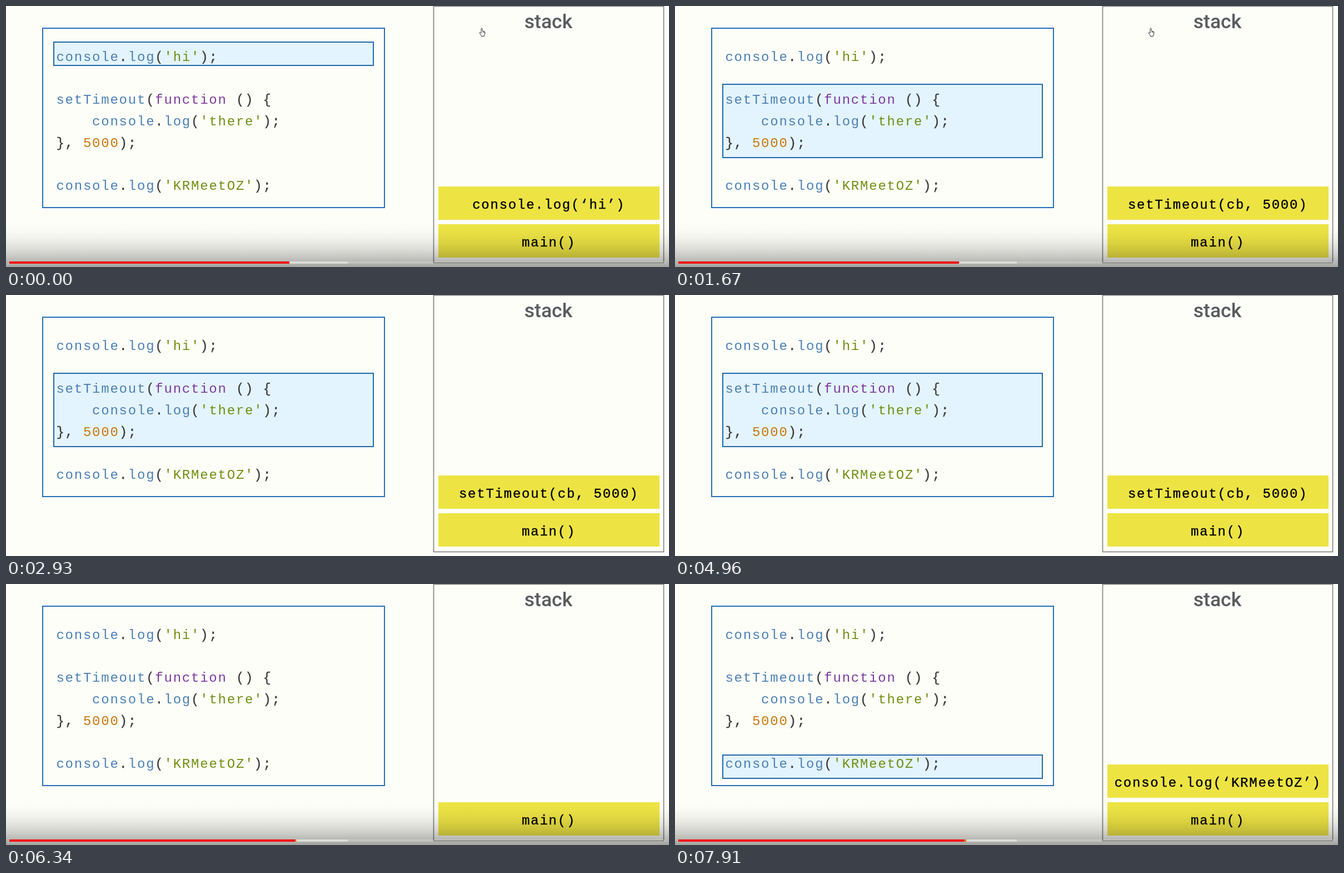
Write an HTML page that moves like this. It is 1193 by 470 pixels and loops after 7.99 s.

```html
<!DOCTYPE html>
<html lang="en">
<head>
<meta charset="utf-8">
<title>Call stack</title>
<style>
  html, body { margin: 0; width: 100%; height: 100%; overflow: hidden; background: #fefef9; }
  svg { display: block; width: 1193px; height: 470px; }
  .mono {
    font: 24px "Liberation Mono", "Courier New", monospace;
    letter-spacing: 1.77px;
    white-space: pre;
  }
  .title { font: 500 35.5px Roboto, sans-serif; fill: #595c5f; }
  .id { fill: #4a7fb3; }
  .kw { fill: #7b3a9d; }
  .str { fill: #6f8e10; }
  .num { fill: #c87608; }
  .op { fill: #3a3a3a; stroke: #3a3a3a; stroke-width: .3; }
  .frame { fill: none; stroke: #2470b8; stroke-width: 2; }
  .mark { fill: #e4f4fe; stroke: #1f68aa; stroke-width: 2; }
  .call { fill: #ede444; }
  .label { stroke: #000; stroke-width: .35; }
</style>
</head>
<body>
<svg viewBox="0 0 1193 470" xmlns="http://www.w3.org/2000/svg">
  <defs><linearGradient id="shade" x1="0" y1="0" x2="0" y2="1"></linearGradient></defs>
  <rect width="1193" height="470" fill="#fefef9"/>
  <rect class="frame" x="66" y="40" width="615" height="323"/>
  <g id="marks"></g>
  <g id="code"></g>
  <rect x="769.5" y="0.5" width="414" height="462" fill="none" stroke="#858585" stroke-width="1.7"/>
  <text class="title" x="976" y="40" text-anchor="middle">stack</text>
  <g id="calls"></g>
  <g id="controls">
    <rect y="388" width="1193" height="82" fill="url(#shade)"/>
    <rect x="6" y="460" width="1181" height="4" fill="#fff" fill-opacity=".2"/>
    <rect x="6" y="460" width="609" height="4" fill="#dcdcd8"/>
    <rect id="tail" x="520" y="460" height="4" fill="#d07a18"/>
    <rect id="played" x="6" y="460" height="4" fill="#f40808"/>
  </g>
  <path id="hand" d="M855 49V41.3q0-1.3 1.1-1.3t1.1 1.3V45l3.4.7q1.4.3 1.3 1.8l-.4 3.5-1 2v1.5h-5.2v-1.4l-2.9-3.9q-.8-1.3.3-1.7.9-.2 2.3 1.5z M858.7 46v2 M860.4 46.4v1.8"
    fill="#fff" stroke="#333" stroke-linejoin="round"/>
</svg>
<script>
const NS = 'http://www.w3.org/2000/svg';
const LOOP = 7990;
const FADE = 150;
const MARK_DELAY = 220;
const JUMP = 2060;
const CELL = 16.17;
const $ = id => document.getElementById(id);

function add(parent, tag, attrs, text) {
  const el = document.createElementNS(NS, tag);
  for (const k in attrs) el.setAttribute(k, attrs[k]);
  if (text) el.textContent = text;
  parent.append(el);
  return el;
}

const code = `console.log('hi');

setTimeout(function () {
    console.log('there');
}, 5000);

console.log('KRMeetOZ');`;

function kind(token) {
  if (token === 'function') return 'kw';
  if (token[0] === "'") return 'str';
  if (/\d/.test(token)) return 'num';
  return /[a-z]/i.test(token) ? 'id' : 'op';
}

code.split('\n').forEach((line, i) => {
  const row = add($('code'), 'text', { class: 'mono', x: 90.4, y: 98.8 + i * 38.75 });
  for (const token of line.match(/'\w+'|\w+|[^\w']+/g) || []) {
    add(row, 'tspan', { class: kind(token) }, token);
  }
});

// Shade deepens with the square of the height.
for (let u = 0; u <= 1; u += 0.125) {
  add($('shade'), 'stop', { offset: u, 'stop-color': '#000', 'stop-opacity': 0.36 * u * u });
}

function addCall(y, label) {
  const g = add($('calls'), 'g', {});
  add(g, 'rect', { class: 'call', x: 778, y, width: 398, height: 60 });
  add(g, 'text', {
    class: 'mono label', x: 976.6 - label.length * CELL / 2, y: y + 39.5
  }, label);
  return g;
}

addCall(393, 'main()');

// The calls share the slot above main(); each marks its lines of code.
const calls = [
  { label: 'console.log(‘hi’)', top: 65, height: 42, push: -1000, pop: 500 },
  { label: 'setTimeout(cb, 5000)', top: 141, height: 132, push: 870, pop: 5970 },
  { label: 'console.log(‘KRMeetOZ’)', top: 308, height: 42, push: 6490, pop: LOOP }
];
for (const c of calls) {
  c.block = addCall(325, c.label);
  c.mark = add($('marks'), 'rect', { class: 'mark', x: 86, y: c.top, width: 575, height: c.height });
}

const ramp = (t, start, span = FADE) => Math.min(1, Math.max(0, (t - start) / span));
const shown = (t, from, to, span) => ramp(t, from, span) - ramp(t, to, span);
const fade = (el, v) => el.setAttribute('opacity', v);

// The video plays on, with one skip ahead.
const playhead = t => t < JUMP ? 510 + t / 1670 : 517 + (t - JUMP) / 800;

function draw(t) {
  for (const c of calls) {
    fade(c.block, shown(t, c.push, c.pop));
    fade(c.mark, shown(t, c.push + MARK_DELAY, c.pop));
  }
  fade($('controls'), 1 - shown(t, 2830, 5100, 100));
  fade($('hand'), t < JUMP ? 1 : 0);
  const end = playhead(t);
  $('played').setAttribute('width', Math.min(end, 520) - 6);
  $('tail').setAttribute('width', Math.max(0, end - 520));
}

let begin;
function tick(now) {
  begin ??= now;
  draw((now - begin) % LOOP);
  requestAnimationFrame(tick);
}
draw(0);
requestAnimationFrame(tick);
</script>
</body>
</html>
```
